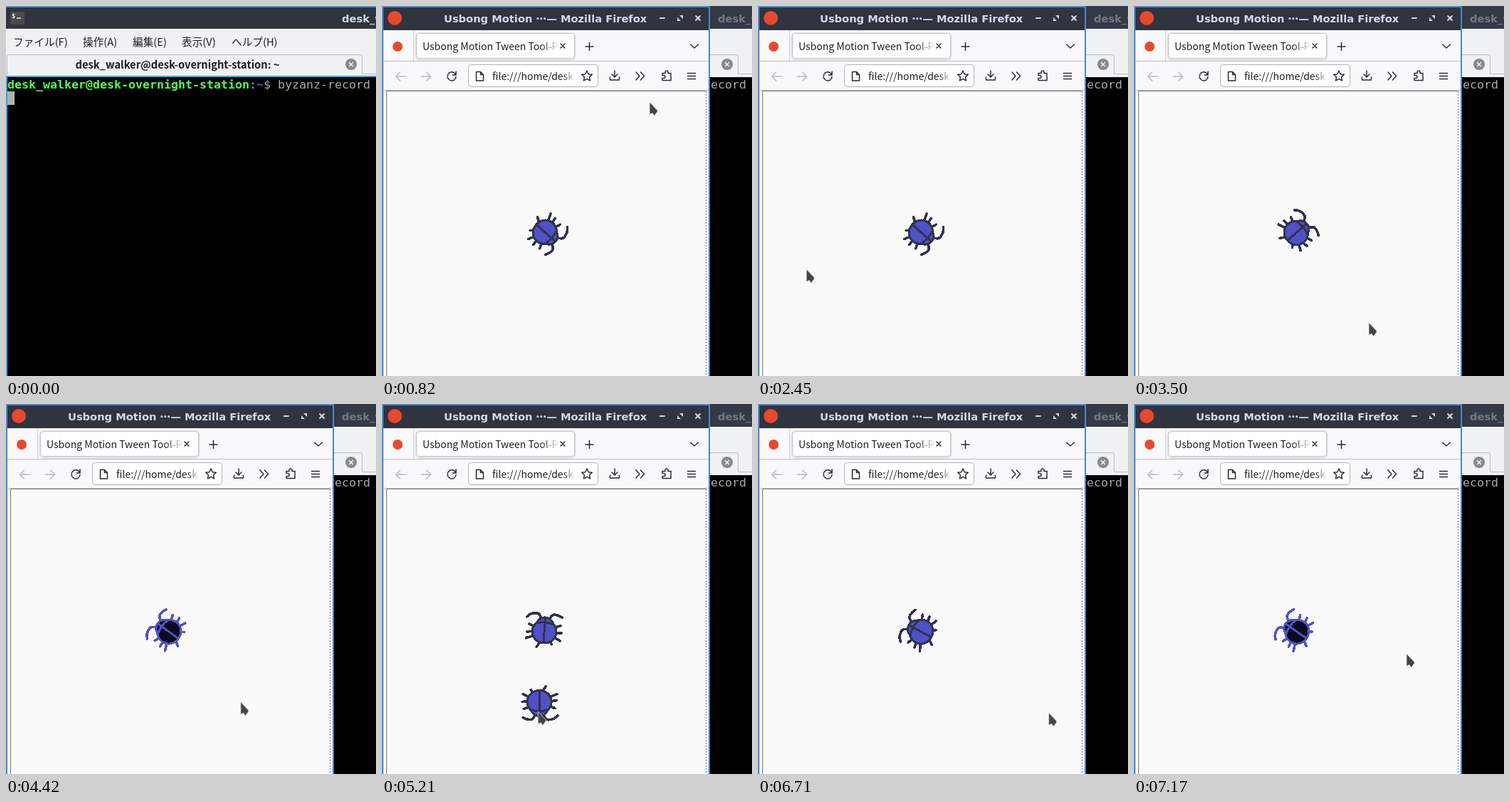
Animation of 520 by 520 pixels, one loop 7.27 s. Source, as an HTML page:

```html
<!DOCTYPE html>
<html lang="ja">
<head>
<meta charset="utf-8">
<title>Motion tween recording</title>
<style>
  html, body { margin: 0; width: 100%; height: 100%; overflow: hidden; background: #000; }
  svg { display: block; width: 520px; height: 520px; }
  text { white-space: pre; }
  .ui { font: 14.67px "Noto Sans CJK JP", "Noto Sans CJK", "Noto Sans", sans-serif; fill: #1d1d22; }
  .small { font-size: 14px; }
  .bold { font-weight: 700; }
  .title { font: bold 14.67px "DejaVu Sans", sans-serif; fill: #d3dae3; }
  .mono { font: 16.61px "DejaVu Sans Mono", monospace; fill: #aaa; }
  .line { fill: none; stroke: #2b2a33; stroke-width: 1.5; stroke-linecap: round; stroke-linejoin: round; }
  .off { stroke: #b9b9be; }
  .light { stroke: #d3dae3; stroke-width: 2; }
  .bug { --body: #5050c8; --ink: #32324c; shape-rendering: crispEdges; }
  .bug.flash { --body: #0b0b20; --ink: #5252c6; }
  .shell { fill: var(--body); stroke: var(--ink); stroke-width: 3; }
  .limbs { fill: none; stroke: var(--ink); stroke-width: 3.6; stroke-linecap: round; stroke-linejoin: round; }
  .seams { stroke-width: 3; }
  .blurred .focus { visibility: hidden; }
  .blurred #term-bar { fill: #353945; }
  .blurred #term-title { fill: #747985; }
</style>
</head>
<body>
<svg id="stage" viewBox="0 0 520 520">
  <defs>
    <linearGradient id="fade"><stop stop-color="#fff" stop-opacity="0"/><stop offset="1" stop-color="#fff"/></linearGradient>
    <clipPath id="url-clip"><rect x="150" y="84" width="121" height="28"/></clipPath>
    <clipPath id="tab-clip"><rect x="54" y="42" width="194" height="28"/></clipPath>
    <!-- beetle, head pointing down -->
    <g id="beetle" transform="translate(.8 0)">
      <path class="limbs" d="M-8-13L-12-18M5-16L9-23M-15-8L-23-12M-17-2L-24-1M-14 6L-22 9M15-8L25-12M17-2L24-3M14 5L22 8"/>
      <path class="limbs" d="M-6 17Q-8 24-13 24Q-18 24-23 21M6 17Q8 25 14 24Q21 24 26 18"/>
      <path class="shell" d="M0-17C10-17 17-10 17-1C17 5 14 9 11 12C9 16 5 19 0 19C-5 19-9 16-11 12C-14 9-17 5-17-1C-17-10-10-17 0-17Z"/>
      <path class="limbs seams" d="M0-16V17M-12 10Q0 14 12 10"/>
    </g>
  </defs>

  <!-- terminal window -->
  <rect width="520" height="520"/>
  <rect id="term-bar" width="520" height="33" fill="#2f343f"/>
  <rect class="focus" width="520" height="2" fill="#4a90d9"/>
  <rect x="6" y="8" width="20" height="18" rx="1" fill="#4a4a4a"/>
  <text x="8" y="17" font-family="DejaVu Sans Mono, monospace" font-weight="700" font-size="9" fill="#eee">$</text>
  <path d="M15 17h6" stroke="#eee" stroke-width="1.5"/>
  <text id="term-title" class="title" x="472" y="23">desk_walker@desk-overnight-station: ~</text>
  <rect y="32" width="520" height="68" fill="#f0f1f3"/>
  <g class="ui">
    <text x="10" y="56">ファイル(F)</text>
    <text x="108" y="56">操作(A)</text>
    <text x="178" y="56">編集(E)</text>
    <text x="247" y="56">表示(V)</text>
    <text x="317" y="56">ヘルプ(H)</text>
  </g>
  <path d="M1.5 97V70.5Q1.5 68.5 3.5 68.5H498.5Q500.5 68.5 500.5 70.5V95.5H520" fill="none" stroke="#b8bcc2"/>
  <text class="ui bold" x="241" y="88" text-anchor="middle">desk_walker@desk-overnight-station: ~</text>
  <circle cx="485" cy="82" r="8" fill="#85888c"/>
  <path d="M482 79l6 6m0-6l-6 6" stroke="#f5f5f5" stroke-width="1.5"/>
  <path class="focus" d="M1 520V99H520" fill="none" stroke="#35a7e4" stroke-width="2"/>
  <text class="mono" x="2" y="116"><tspan font-weight="700" fill="#5f5">desk_walker@desk-overnight-station</tspan>:<tspan font-weight="700" fill="#55c">~</tspan>$ byzanz-record</text>
  <rect x="2" y="120" width="10" height="19" fill="#b2b2b2"/>

  <!-- browser window -->
  <g id="browser">
    <rect width="461" height="520" fill="#f9f9fb"/>
    <rect width="461" height="34" fill="#2f343f"/>
    <circle cx="18" cy="17" r="10" fill="#e8492d"/>
    <text class="title" x="87" y="23">Usbong Motion ⋯— Mozilla Firefox</text>
    <path class="line light" d="M391 17h6M441 14l6 6m0-6l-6 6"/>
    <path d="M418 13h5v5zM415 16v5h5z" fill="#d3dae3"/>

    <circle cx="22" cy="57" r="7" fill="#e8492d"/>
    <path d="M44.5 34V77" stroke="#d0d0d6"/>
    <rect x="47.5" y="38.5" width="224" height="37" rx="5" fill="none" stroke="#dcdce2" stroke-width="2"/>
    <rect x="48.5" y="38.5" width="222" height="35" rx="4" fill="#fff" stroke="#c2c2c8"/>
    <g clip-path="url(#tab-clip)"><text class="ui small" x="57" y="62">Usbong Motion Tween Tool-Pa</text></g>
    <rect x="222" y="42" width="28" height="28" fill="url(#fade)"/>
    <path class="line" d="M251 53l6 6m0-6l-6 6M286 57h11m-5.5-5.5v11M433.5 54l5.500 5 5.500-5"/>
    <path d="M2 77.5H459M2 118.5H459" stroke="#bcbcc2"/>

    <path class="line off" d="M33 99H20m5.500-6l-6 6 6 6M55 99H68m-5.500-6l6 6-6 6"/>
    <path class="line" d="M103 95.500a6 6 0 1 0 1 4M104 92v5h-5"/>
    <rect x="121.5" y="82.5" width="182" height="31" rx="4" fill="#fff" stroke="#b0b0b8"/>
    <path class="line" d="M132.500 92.500h6l4 4v8.500h-10zM138.500 92.500v4h4"/>
    <g clip-path="url(#url-clip)"><text class="ui small" x="155" y="104">file:///home/desk_walker</text></g>
    <rect x="254" y="84" width="18" height="28" fill="url(#fade)"/>
    <path class="line" d="M288 91l2.200 4.700 5.100.6-3.800 3.500 1 5.100-4.500-2.500-4.500 2.500 1-5.100-3.800-3.500 5.100-.6z"/>
    <path class="line" d="M327 91v9m-4-4l4 4 4-4M320.500 100v4h13v-4M357 93l5 5.500-5 5.500M363.500 93l5 5.500-5 5.500M429.500 94.500h11m-11 4h11m-11 4h11"/>
    <path class="line" d="M394 94.500h4v-1.500a2 2 0 0 1 4 0v1.500h4v10h-12v-3h2a2 2 0 0 0 0-4h-2z"/>

    <rect x="6" y="119" width="450" height="401" fill="#fafafa"/>
    <path d="M6.500 520V119.500H455.500" fill="none" stroke="#777"/>
    <path d="M455.500 120V520" stroke="#777" stroke-dasharray="2"/>
    <path d="M1 520V1H460V520" fill="none" stroke="#4a86d4" stroke-width="2"/>

    <use id="anchor" class="bug" href="#beetle"/>
    <use id="puppet" class="bug" href="#beetle"/>
    <path id="pointer" d="M0 0V17.500L4 15.500 6.500 19.500 11 13.500V11.500Z" fill="#454545" stroke="#e4e4e4" stroke-width=".8"/>
  </g>
</svg>
<script>
const LOOP = 7270, OPEN = 260, LOADED = 345;
const HOME = { x: 229, y: 319 }, REACH = 101, HOLD = 180;
const ENTRY = { x: 454, y: 190 }, FIRST_AIM = { x: 42, y: 153 };
const $ = id => document.getElementById(id);

// The pointer rests between moves. A tap presses on arrival, a drag all the way.
const move = (from, to, x, y, kind) => ({ from, to, x, y, kind });
const moves = [
  move(570, 820, 376, 135),
  move(820, 1270, 399, 150, "tap"),
  move(1310, 1950, 42, 153, "tap"),
  move(2090, 2450, 68, 370),
  move(2450, 3120, 77, 446, "tap"),
  move(3300, 3500, 330, 445),
  move(3750, 4120, 385, 433, "tap"),
  move(4260, 4750, 217, 390),
  move(4890, 5610, 222, 485, "drag"),
  move(5650, 6340, 408, 416, "drag"),
  move(6430, 6870, 409, 444, "tap"),
  move(7100, 7170, 383, 351)
];

const lerp = (a, b, k) => a + (b - a) * k;
const angleTo = p => Math.atan2(p.y - HOME.y, p.x - HOME.x);

// Replays the moves up to t: pointer place, the spot the beetle shuns, pressed states.
function stateAt(t) {
  let pointer = ENTRY, aim = FIRST_AIM, flash = false, dragging = false;
  for (const m of moves) {
    if (t < m.from) {
      flash = flash && t < m.from + HOLD;
      break;
    }
    const k = Math.min(1, (t - m.from) / (m.to - m.from));
    pointer = { x: lerp(pointer.x, m.x, k), y: lerp(pointer.y, m.y, k) };
    dragging = m.kind === "drag";
    const tapped = m.kind === "tap" && k === 1;
    if (dragging || tapped) aim = pointer;
    flash = tapped || (flash && t < m.from + HOLD);
  }
  return { pointer, aim, flash, dragging };
}

function place(el, x, y, turn = 0) {
  el.setAttribute("transform", `translate(${x} ${y}) rotate(${turn})`);
}

function show(el, on) {
  el.style.visibility = on ? "visible" : "hidden";
}

function draw(t) {
  const { pointer, aim, flash, dragging } = stateAt(t);
  $("browser").style.display = t >= OPEN ? "" : "none";
  $("stage").classList.toggle("blurred", t >= OPEN);

  place($("anchor"), HOME.x, HOME.y, angleTo(aim) * 180 / Math.PI + 90);
  $("anchor").classList.toggle("flash", flash);
  show($("anchor"), t >= LOADED);

  const dir = angleTo(pointer);
  const pull = Math.min(REACH, Math.hypot(pointer.x - HOME.x, pointer.y - HOME.y));
  place($("puppet"), HOME.x + pull * Math.cos(dir), HOME.y + pull * Math.sin(dir));
  show($("puppet"), dragging);

  place($("pointer"), pointer.x, pointer.y);
  show($("pointer"), t >= moves[0].from);
}

const start = performance.now();
function tick(now) {
  draw(Math.max(0, now - start) % LOOP);
  requestAnimationFrame(tick);
}
draw(0);
requestAnimationFrame(tick);
</script>
</body>
</html>
```
